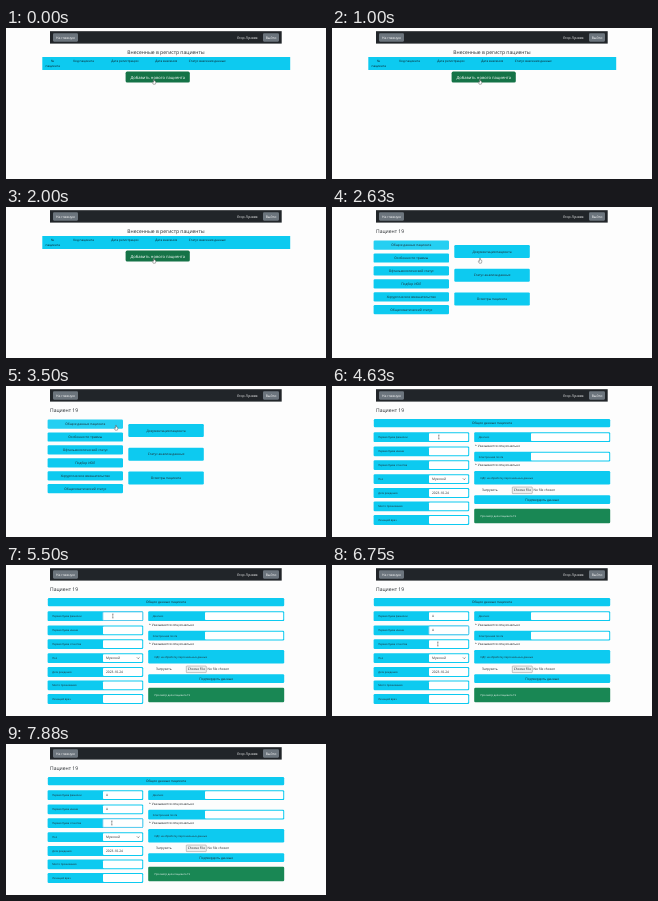
An HTML page for the animation above (8 s loop, 320 by 151 pixels).

```html
<!DOCTYPE html>
<html lang="ru">
<head>
<meta charset="utf-8">
<style>
html, body { margin: 0; width: 100%; height: 100%; overflow: hidden; background: #fdfdfd; }
svg { display: block; width: 100%; height: 100%; }
text { font-family: "Open Sans", "Noto Sans", sans-serif; text-rendering: geometricPrecision; }
</style>
</head>
<body>
<svg id="stage" viewBox="0 0 320 151"></svg>
<script>
const LOOP = 8000;
const CYAN = '#0dcaf0', GREEN = '#198754', HOVER = '#157347', DARK = '#212529', GREY = '#6c757d';
const stage = document.getElementById('stage');

function el(parent, tag, attrs) {
  const node = document.createElementNS('http://www.w3.org/2000/svg', tag);
  for (const key in attrs) node.setAttribute(key, attrs[key]);
  parent.appendChild(node);
  return node;
}
const group = parent => el(parent, 'g', {});
const box = (g, x, y, width, height, fill, rx = 0, more = {}) =>
  el(g, 'rect', { x, y, width, height, fill, rx, ...more });
function label(g, text, x, y, size, fill = DARK, anchor = 'start') {
  const node = el(g, 'text', { x, y, 'font-size': size, fill, 'text-anchor': anchor });
  node.textContent = text;
  return node;
}
const centered = (g, text, x, y, size, fill) => label(g, text, x, y, size, fill, 'middle');

function navbar(g) {
  box(g, 44, 3.2, 231.7, 12.4, DARK);
  box(g, 47, 5.3, 25, 8.4, GREY, 1.1);
  centered(g, 'На главную', 59.6, 10.7, 3.4, '#fff');
  label(g, 'Егор Луняев', 231.2, 10.6, 3.4, '#fff');
  box(g, 257, 5.3, 16, 8.4, GREY, 1.1);
  centered(g, 'Выйти', 265, 10.7, 3.4, '#fff');
}

function listPage(g) {
  centered(g, 'Внесенные в регистр пациенты', 160, 26, 5);
  box(g, 36.3, 29, 247.9, 13, CYAN);
  const heads = [['№', 46.7], ['Код пациента', 77.6], ['Дата регистрации', 118.8],
    ['Дата внесения', 160.2], ['Статус внесения данных', 201.2]];
  for (const [text, x] of heads) centered(g, text, x, 34.4, 3.1, '#0b1c22');
  centered(g, 'пациента', 46.7, 39.2, 3.1, '#0b1c22');
  box(g, 119.6, 43.6, 64.2, 10.9, HOVER, 1.6);
  centered(g, 'Добавить нового пациента', 151.8, 50.6, 4.1, '#fff');
}

function menuPage(g) {
  label(g, 'Пациент 19', 44, 26, 5);
  const left = ['Общие данные пациента', 'Особенности травмы', 'Офтальмологический статус',
    'Подбор ИОЛ', 'Хирургическое вмешательство', 'Общесоматический статус'];
  left.forEach((text, i) => {
    const y = 38.1 + i * 12.92;
    box(g, 41.6, y - 4.6, 75.4, 9.2, i ? CYAN : '#25cff2', 1.2);
    centered(g, text, 79.3, y + 1.1, 3.25);
  });
  ['Документация пациента', 'Статус анализа данных', 'Осмотры пациента'].forEach((text, i) => {
    const y = 44.5 + i * 23.7;
    box(g, 122.3, y - 6.5, 75.5, 13, CYAN, 1.2);
    centered(g, text, 160, y + 1.1, 3.25);
  });
}

const ROW_Y = [51.2, 65.3, 79.1, 93.1, 107, 120.3, 134];
const values = [], rings = [];

function field(g, text, x, y, split, right) {
  box(g, x, y - 4.9, right - x, 9.8, CYAN, 1.2);
  box(g, split, y - 3.9, right - 1 - split, 7.8, '#fff', 0.8);
  label(g, text, x + 4.6, y + 1, 2.6);
}

function formPage(g) {
  label(g, 'Пациент 19', 44, 26, 5);
  box(g, 41.8, 33, 236.4, 8.2, CYAN, 1.2);
  centered(g, 'Общие данные пациента', 160, 38.2, 3.25);

  const rows = ['Первая буква фамилии', 'Первая буква имени', 'Первая буква отчества', 'Пол',
    'Дата рождения', 'Место проживания', 'Лечащий врач'];
  rows.forEach((text, i) => {
    const y = ROW_Y[i];
    field(g, text, 41.6, y, 97, 137.2);
    if (i < 3) {
      rings.push(box(g, 96.8, y - 4.3, 39.9, 8.6, '#fff', 1,
        { stroke: '#55c8ee', 'stroke-width': 0.9 }));
      values.push(label(g, '', 100, y + 1.1, 3.2));
    }
  });
  label(g, 'Мужской', 100, ROW_Y[3] + 1.1, 3.25);
  el(g, 'path', { d: 'M130.9 92.4l1.3 1.3 1.3-1.3', fill: 'none', stroke: DARK, 'stroke-width': 0.5 });
  label(g, '2023-10-24', 100, ROW_Y[4] + 1.1, 3.25);

  field(g, 'Диагноз', 142.2, 51.2, 199, 278.2);
  label(g, '* Указывается опционально', 143, 61, 3.25);
  field(g, 'Электронная почта', 142.2, 70.6, 199, 278.2);
  label(g, '* Указывается опционально', 143, 80.2, 3.25);

  box(g, 142.2, 85, 136, 13.4, CYAN, 1.2);
  label(g, 'ИДС на обработку персональных данных', 148.6, 92.7, 2.6);
  label(g, 'Загрузить', 150, 105.3, 3.25);
  box(g, 180.3, 101, 20, 6.6, '#efefef', 0.6, { stroke: '#767676', 'stroke-width': 0.4 });
  centered(g, 'Choose File', 190.3, 105.4, 3.25);
  label(g, 'No file chosen', 201.6, 105.4, 3.25);
  box(g, 142.2, 109.2, 136, 8.8, CYAN, 1.2);
  centered(g, 'Подтвердить данные', 210.2, 114.7, 3.25);
  box(g, 142.2, 122.8, 136, 14.4, GREEN, 1.2);
  label(g, 'Просмотр дела пациента 19', 148.6, 131, 2.6, '#fff');
}

box(stage, 0, 0, 320, 151, '#fdfdfd');
navbar(group(stage));
const pages = [listPage, menuPage, formPage].map(draw => {
  const g = group(stage);
  draw(g);
  return g;
});
const caret = box(stage, 0, 0, 0.4, 4.4, DARK);
const hand = el(stage, 'path', {
  d: 'M-.5-1.6Q0-2 .5-1.6V0L1.8.4V2L1.3 3.2H-.8L-1.8 1.2-1.2.8-.5 1.3Z',
  fill: '#fff', stroke: '#222', 'stroke-width': 0.35
});
const beam = el(stage, 'path', {
  d: 'M-.8-1.9H.8M0-1.9V1.9M-.8 1.9H.8', fill: 'none', stroke: '#333', 'stroke-width': 0.4
});

// pointer stops: time, x, y
const stops = [[0, 148, 53], [2630, 148, 53], [3250, 110, 41], [3750, 110, 41], [4300, 106.8, 51],
  [6200, 106.8, 51], [6600, 105.8, 79], [LOOP, 105.8, 79]];

function pointerAt(t) {
  const i = stops.findIndex(s => s[0] > t);
  const [t0, x0, y0] = stops[i - 1], [t1, x1, y1] = stops[i];
  const p = (t - t0) / (t1 - t0), k = p * p * (3 - 2 * p);
  return [x0 + (x1 - x0) * k, y0 + (y1 - y0) * k];
}

const show = (node, on) => node.setAttribute('visibility', on ? 'visible' : 'hidden');
const focusTimes = [4880, 6130, 7130];
const typeTimes = [5750, 6500, Infinity];

function render(t) {
  const page = t < 2250 ? 0 : t < 3750 ? 1 : 2;
  pages.forEach((g, i) => g.setAttribute('display', i === page ? 'inline' : 'none'));

  const focus = focusTimes.filter(start => t >= start).length - 1;
  rings.forEach((ring, i) => show(ring, i === focus));
  values.forEach((v, i) => { v.textContent = t >= typeTimes[i] ? 'А' : ''; });
  if (focus >= 0) {
    caret.setAttribute('x', t >= typeTimes[focus] ? 102.4 : 100);
    caret.setAttribute('y', ROW_Y[focus] - 2.2);
  }
  show(caret, focus >= 0 && (t - focusTimes[focus]) % 1000 < 500);

  const [x, y] = pointerAt(t);
  const overText = page === 2 && t > 4000;
  for (const cursor of [hand, beam]) cursor.setAttribute('transform', `translate(${x} ${y})`);
  show(hand, !overText);
  show(beam, overText);
}

function tick() {
  render(performance.now() % LOOP);
  requestAnimationFrame(tick);
}
tick();
</script>
</body>
</html>
```
